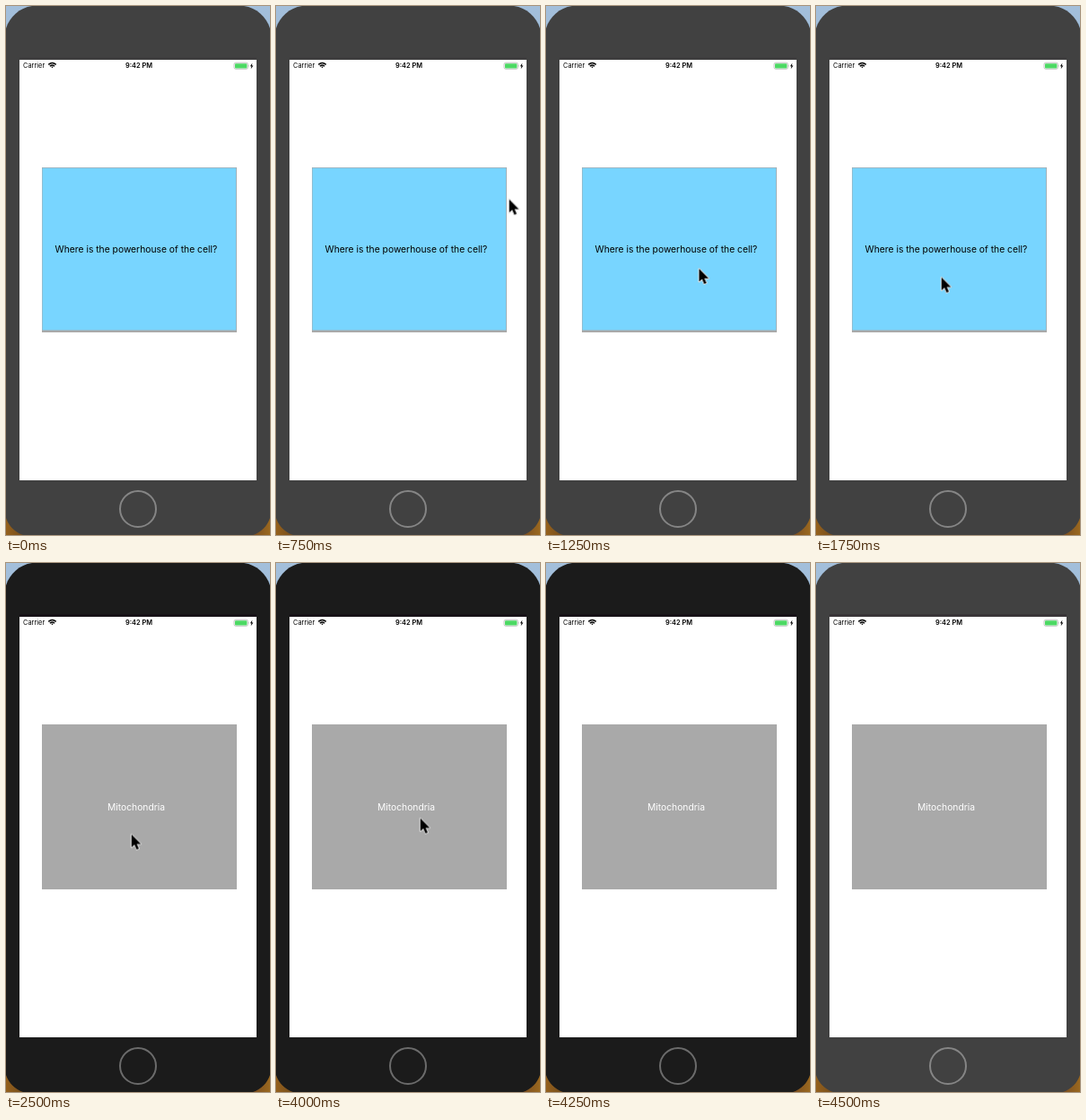
Write an HTML page that moves like this. It is 294 px wide and 590 px high and loops after 5250 ms.

```html
<!DOCTYPE html>
<html lang="en">
<head>
<meta charset="utf-8">
<title>Flash card</title>
<style>
  html, body { margin: 0; width: 100%; height: 100%; overflow: hidden; }
  svg { display: block; width: 100%; height: 100%; }
  text { font-family: Inter, Roboto, sans-serif; }
  .status { font-size: 7.4px; }
  .label { font-size: 10.3px; text-anchor: middle; }
</style>
</head>
<body>
<svg viewBox="0 0 294 590">
  <defs>
    <linearGradient id="sky" x2="0" y2="1">
      <stop offset="0" stop-color="#a3bfdb"/>
      <stop offset="1" stop-color="#8eaed0"/>
    </linearGradient>
    <linearGradient id="ground">
      <stop offset="0" stop-color="#94601c"/>
      <stop offset=".1" stop-color="#65451f"/>
      <stop offset=".9" stop-color="#6b4022"/>
      <stop offset="1" stop-color="#9a681f"/>
    </linearGradient>
  </defs>

  <rect width="294" height="295" fill="url(#sky)"/>
  <rect y="295" width="294" height="295" fill="url(#ground)"/>
  <path id="phone" d="M0 25C4 12 15 2 29 0H265C279 2 290 12 294 25V571C291 580 284 587 275 590H19C10 587 3 580 0 571Z"/>
  <rect id="bezel" x="15" y="57" width="264" height="3"/>
  <circle id="home" cx="147" cy="561" r="20" fill="none" stroke-width="2"/>
  <rect x="15" y="60" width="264" height="469" fill="#fff"/>

  <g class="status">
    <text x="19" y="69.2">Carrier</text>
    <text x="148" y="69.3" text-anchor="middle" font-weight="600">9:42 PM</text>
  </g>
  <g fill="none" stroke="#000" stroke-width="1.5">
    <path d="M47.3 65.4Q51.5 61.7 55.7 65.4M48.9 67.2Q51.5 64.9 54.1 67.2"/>
    <path d="M50.2 67.8Q51.5 67 52.8 67.8L51.5 69.3Z" fill="#000" stroke="none"/>
  </g>
  <rect x="254" y="63.3" width="15.4" height="7" rx="1.8" fill="#fff" stroke="#aaa" stroke-width=".7"/>
  <rect x="255" y="64.2" width="13.4" height="5.2" rx=".9" fill="#4cd964"/>
  <path d="M270.3 65.7q1 1.1 0 2.2Z" fill="#aaa"/>
  <path d="M274.4 63.6L271.9 67.3H273.4L272.7 70.2L275.4 66.4H273.8Z"/>

  <rect x="40" y="180" width="217" height="184" fill="#a9a9a9"/>
  <g id="question">
    <rect x="40.5" y="180.7" width="215.7" height="180.8" fill="#78d5ff"/>
    <text class="label" x="144.9" y="275">Where is the powerhouse of the cell?</text>
  </g>
  <text id="answer" class="label" x="145" y="275.8" fill="#fff">Mitochondria</text>

  <g id="cursor">
    <path d="M0 0V14.6L3.3 11.6L5.7 17L8.2 15.9L5.9 10.7H10.6Z" stroke="#fff" stroke-width="1.6"
      stroke-linejoin="round" paint-order="stroke" style="filter:drop-shadow(0 .7px .6px #0006)"/>
  </g>
</svg>
<script>
const LOOP = 5250;

// Each step is [start in ms, value]; the value holds until the next step.
function play(id, prop, steps) {
  const frames = steps.map(([ms, value]) => ({ offset: ms / LOOP, [prop]: value, easing: 'step-end' }));
  frames.push({ offset: 1, [prop]: steps.at(-1)[1] });
  const anim = document.getElementById(id).animate(frames, { duration: LOOP, iterations: Infinity });
  anim.startTime = document.timeline.currentTime;
}

const move = (ms, x, y) => [ms, `translate(${x}px, ${y}px)`];

play('phone', 'fill', [[0, '#414141'], [2500, '#1b1b1b'], [4500, '#414141']]);
play('bezel', 'fill', [[0, '#3e3d3e'], [2500, '#171217'], [4500, '#393538']]);
play('home', 'stroke', [[0, '#858585'], [2500, '#6b6b6b'], [4500, '#858585']]);
play('question', 'opacity', [[0, 1], [2500, 0]]);
play('answer', 'opacity', [[0, 0], [2500, 1]]);
play('cursor', 'opacity', [[0, 0], [750, 1], [4250, 0]]);
play('cursor', 'transform', [
  move(0, 259.7, 215.7),
  move(1000, 197.5, 267),
  move(1250, 170.5, 293),
  move(1500, 158.5, 298),
  move(1750, 139.7, 302.6),
  move(4000, 160.7, 284.6),
]);
</script>
</body>
</html>
```
